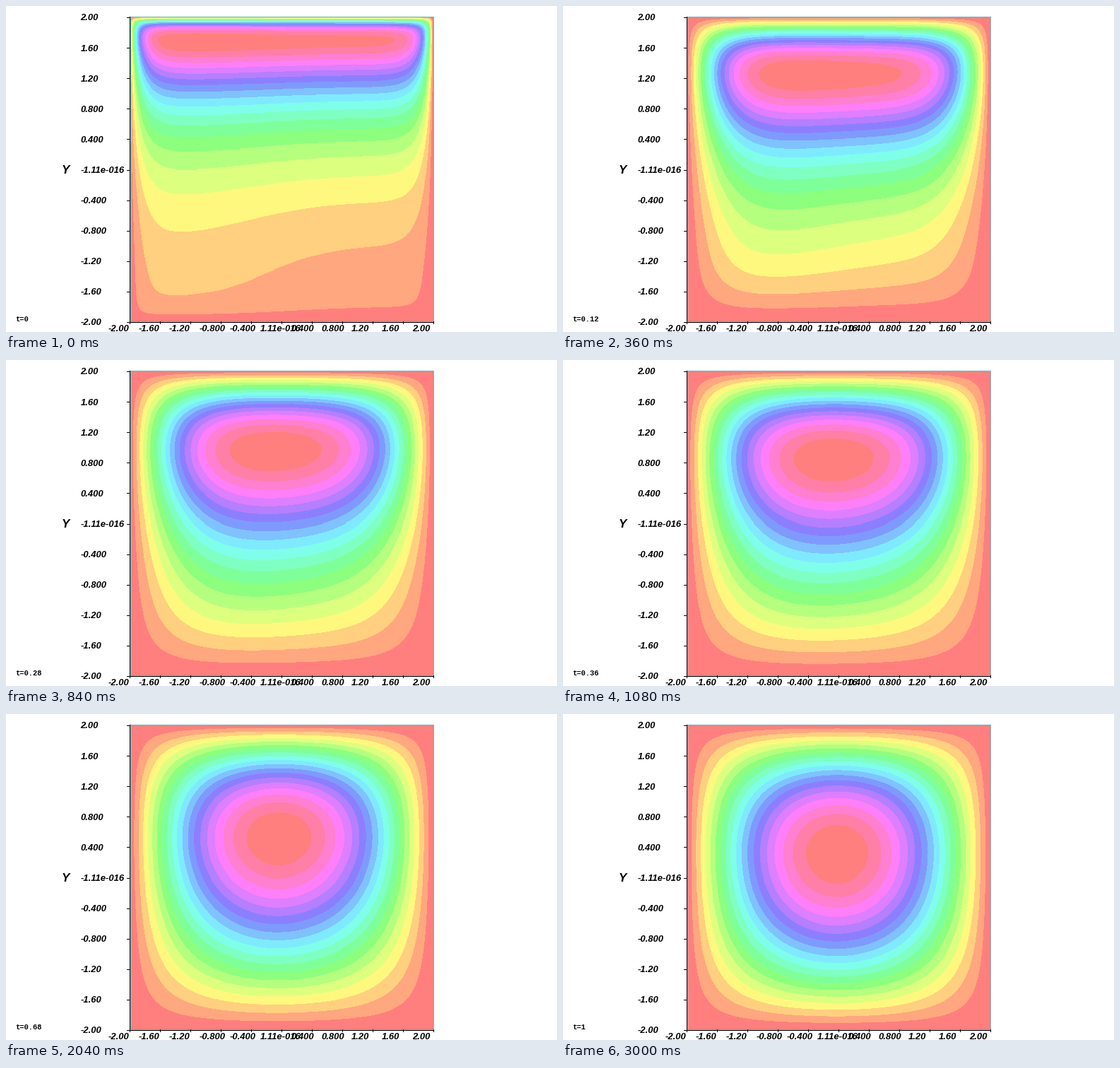
A matplotlib script for the animation above (3.06 s loop, 780x461 px).

```python
import colorsys

import matplotlib.pyplot as plt
import numpy as np
from matplotlib.animation import FuncAnimation

W, H, DPI = 780, 461, 100
FRAMES, INTERVAL = 51, 60
LEFT, TOP, SIDE = 175, 16, 430      # plot square in pixels
DT, MODES, BANDS = 0.02, 70, 20

# Implicit heat equation on [-2, 2]^2 with cold walls, solved in sine modes.
wave = np.arange(1, MODES + 1) * np.pi / 4


def sines(s):
    return np.sin(np.outer(wave, s + 2))


def project(f, n=2000):
    s = -2 + 4 * (np.arange(n) + 0.5) / n
    return sines(s) @ f(s) * 2 / n


flat = project(np.ones_like)
rise = project(lambda y: np.exp(1.1 * y))
tilt = project(lambda x: 0.384 - 0.135 * np.tanh(x + 0.28))
start = np.outer(rise, flat) + np.outer(flat, tilt)     # rows: y, columns: x
damping = 1 / (1 + DT * (wave[:, None] ** 2 + wave[None, :] ** 2))

pixels = -2 + 4 * (np.arange(SIDE) + 0.5) / SIDE
basis_x = sines(pixels)
basis_y = sines(-pixels)
palette = np.array([colorsys.hsv_to_rgb(i / (BANDS - 1), 0.5, 1)
                    for i in range(BANDS)])


def field(step):
    u = basis_y.T @ (start * damping ** (step + 1)) @ basis_x
    band = np.floor(BANDS * u / u.max()).astype(int)
    return palette[np.clip(band, 0, BANDS - 1)]


fig = plt.figure(figsize=(W / DPI, H / DPI), dpi=DPI, facecolor="white")
ax = fig.add_axes([0, 0, 1, 1])
ax.axis("off")


def label(x, y, text, size=13, font="Liberation Sans", style="italic"):
    return ax.text(x, y, text, fontsize=size * 72 / DPI, family=font,
                   style=style, weight="bold", color="black",
                   ha="left", va="baseline")


def line(x, y, color="black"):
    ax.plot(x, y, color=color, lw=72 / DPI, antialiased=False,
            solid_capstyle="butt")


right, bottom = LEFT + SIDE, TOP + SIDE
image = ax.imshow(field(0), extent=(LEFT, right, bottom, TOP),
                  interpolation="nearest", aspect="auto")
ax.set_xlim(0, W)
ax.set_ylim(H, 0)

# Teal outline, with the two black axes just outside it.
for x in (LEFT + 0.5, right - 0.5):
    line([x, x], [TOP - 1, bottom], "#80b4b4")
for y in (TOP - 0.5, bottom - 0.5):
    line([LEFT, right], [y, y], "#80b4b4")
line([LEFT - 0.5] * 2, [TOP - 1, bottom + 1])
line([LEFT - 1, right], [bottom + 0.5] * 2)

names = ["-2.00", "-1.60", "-1.20", "-0.800", "-0.400", "1.11e-016",
         "0.400", "0.800", "1.20", "1.60", "2.00"]
for i, name in enumerate(names):
    shift = i * SIDE / 10
    x, y = LEFT - 0.5 + shift, bottom + 0.5 - shift
    line([x, x], [bottom, bottom + 3])
    line([LEFT - 4, LEFT], [y, y])
    label(145 + shift, 460, name)
    label(105.5, y + 4, "-" + name if i == 5 else name)
label(79, 237, "Y", 17)
clock = label(13, 446, "", 10.5, "Liberation Mono", "normal")


def update(step):
    image.set_data(field(step))
    clock.set_text(f"t={step * DT:g}")
    return image, clock


anim = FuncAnimation(fig, update, frames=FRAMES, interval=INTERVAL,
                     repeat=True, repeat_delay=0, blit=False)
plt.show()
```
